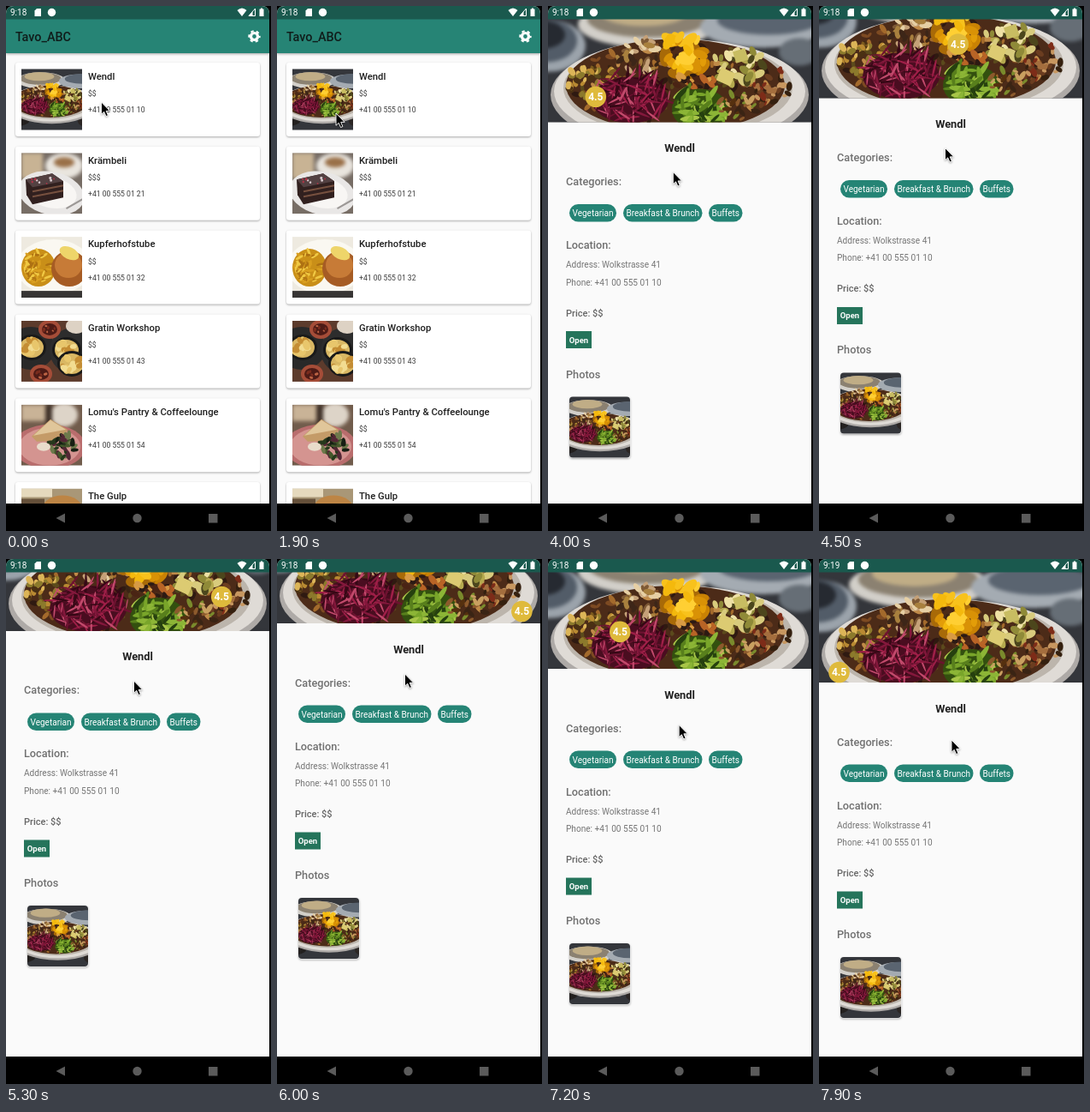
Animation of 310 by 612 pixels, one loop 8000 ms. Source, as an HTML page:

```html
<!DOCTYPE html>
<html lang="en">
<head>
<meta charset="utf-8">
<title>Restaurant list</title>
<style>
html, body { margin: 0; width: 100%; height: 100%; overflow: hidden; background: #000; }
svg { display: block; font-family: Roboto, "Noto Sans", sans-serif; }
.card { fill: #fff; filter: drop-shadow(0 1px 1px rgba(0,0,0,.32)); }
.name { font-size: 11.3px; font-weight: 500; fill: #202020; }
.small { font-size: 8.6px; fill: #3c3c3c; }
.head { font-size: 12.7px; font-weight: 500; fill: #707070; }
.line { font-size: 10.1px; fill: #757575; }
.chip rect { fill: #258475; }
.chip text { font-size: 10.05px; fill: #fff; }
.soft { filter: blur(2px); }
.mid { text-anchor: middle; }
</style>
</head>
<body>
<svg width="310" height="612" viewBox="0 0 310 612">
  <defs>
    <clipPath id="screen"><path d="M0 580V9Q0 0 9 0H299Q308 0 308 9V580Z"/></clipPath>
    <clipPath id="square"><rect width="71" height="71"/></clipPath>
    <clipPath id="round"><rect width="71" height="71" rx="4"/></clipPath>
    <clipPath id="header"><rect id="headerBox" y="15" width="308" height="129"/></clipPath>
    <symbol id="salad" viewBox="0 -8 308 205" overflow="visible"></symbol>
  </defs>

  <g clip-path="url(#screen)">
    <rect width="308" height="580" fill="#fafafa"/>

    <g id="list">
      <g id="rows"></g>
      <rect y="15" width="308" height="40" fill="#268475" style="filter:drop-shadow(0 1px 1.5px rgba(0,0,0,.35))"/>
      <text x="11" y="41" font-size="14.4" font-weight="500" fill="#101c1a">Tavo_ABC</text>
      <g transform="translate(290.500 35.500)" fill="none" stroke="#fff">
        <circle r="4" stroke-width="3.200"/>
        <circle r="6.200" stroke-width="2" stroke-dasharray="3.250 3.243" stroke-dashoffset="1.600"/>
      </g>
    </g>

    <g id="detail">
      <g clip-path="url(#header)"><g id="hero"><use href="#salad" y="-8" width="308" height="205"/></g></g>
      <g id="info">
        <text class="mid" x="154" y="178.500" font-size="12.800" font-weight="700" fill="#202020">Wendl</text>
        <text class="head" x="21" y="217.500">Categories:</text>
        <g class="chip mid" id="chips"></g>
        <text class="head" x="21" y="291.500">Location:</text>
        <text class="line" x="21" y="313.500">Address: Wolkstrasse 41</text>
        <text class="line" x="21" y="334">Phone: +41 00 555 01 10</text>
        <text x="21" y="370" font-size="11" font-weight="500" fill="#666">Price: $$</text>
        <rect x="21" y="387.500" width="30" height="20" fill="#25745b"/>
        <text class="mid" x="36" y="401" font-size="9.500" font-weight="700" fill="#fff">Open</text>
        <text class="head" x="21" y="442">Photos</text>
        <rect class="card" x="25" y="464" width="71.500" height="71.500" rx="4"/>
        <g transform="translate(25 464)" clip-path="url(#round)"><use href="#salad" x="-17.800" width="106.700" height="71"/></g>
      </g>
      <g id="badge">
        <circle r="12.300" fill="#dfba3c"/>
        <text class="mid" y="4.300" font-size="12" font-weight="700" fill="#fff">4.5</text>
      </g>
    </g>

    <rect width="308" height="15.500" fill="#1a594e"/>
    <g fill="#fff">
      <text id="clock" x="5" y="11" font-size="10">9:18</text>
      <path d="M36 3H41V12H33.500V5.500Z"/>
      <circle cx="53.500" cy="7.500" r="4.700"/>
      <path d="M270.500 5Q276 0 281.500 5L276 12Z"/>
      <path d="M284 11.500L291.500 3V11.500Z" fill="none" stroke="#fff"/>
      <path d="M284 11.500L288.500 6.500V11.500Z"/>
      <path d="M296.500 3.500H298V2.500H300V3.500H301.500V12H296.500Z"/>
    </g>
  </g>

  <g fill="#5b5b5b">
    <path d="M58.500 597L69 591.500V602.500Z"/>
    <circle cx="153.500" cy="597" r="5.200"/>
    <rect x="237" y="592" width="10.500" height="10.500"/>
  </g>
  <g id="cursor">
    <path d="M0 0V15.500L3.500 12.300L6 18L8.600 16.900L6.200 11.300H11Z" transform="scale(.92)" fill="#000" stroke="#fff"
      style="filter:drop-shadow(0 1px 1px rgba(0,0,0,.35))"/>
  </g>
</svg>

<script>
const $ = id => document.getElementById(id);

let seed = 11;
const rand = () => (seed = seed * 16807 % 2147483647) / 2147483647;
const ell = (x, y, rx, ry, fill, turn = 0) =>
  `<ellipse cx="${x}" cy="${y}" rx="${rx}" ry="${ry}" fill="${fill}" transform="rotate(${turn} ${x} ${y})"/>`;
const box = (x, y, w, h, fill, turn = 0) =>
  `<rect x="${x}" y="${y}" width="${w}" height="${h}" fill="${fill}" transform="rotate(${turn} ${x} ${y})"/>`;
const soft = s => `<g class="soft">${s}</g>`;

// Random flecks inside an ellipse
function scatter(x, y, rx, ry, count, size, thin, colors) {
  let out = "";
  for (let i = 0; i < count; i++) {
    const a = rand() * 6.283, r = Math.sqrt(rand()), w = size * (.6 + rand() * .7);
    out += ell((x + Math.cos(a) * r * rx).toFixed(1), (y + Math.sin(a) * r * ry).toFixed(1),
      w.toFixed(1), (w * thin).toFixed(1), colors[i % colors.length], Math.floor(rand() * 180));
  }
  return out;
}

$("salad").innerHTML =
  box(-2, -12, 312, 214, "#34363b") +
  soft(ell(2, 55, 42, 30, "#9ba3ab") + ell(-2, 49, 36, 25, "#525c68") + ell(-5, 42, 25, 16, "#262a31") +
    ell(117, 30, 82, 27, "#d2cfc9") + ell(116, 24, 70, 21, "#8b8171") + ell(112, 17, 50, 15, "#c0ad86") +
    ell(250, 33, 72, 24, "#a4abb2") + ell(258, 25, 60, 17, "#5a6470") + ell(294, 62, 24, 16, "#666e76") +
    ell(18, 166, 60, 20, "#23201f") + ell(292, 168, 50, 22, "#2b2624")) +
  ell(154, 112, 151, 64, "#aeaaa7") + ell(154, 108, 147, 61, "#dfdbd6") + ell(152, 104, 134, 56, "#bcb5ac") +
  ell(149, 101, 128, 54, "#4c2b18") +
  scatter(149, 101, 121, 49, 130, 5, .5, ["#7d4a22", "#2f1a11", "#a36a2c", "#5b4a1c", "#c08a48", "#3a2414"]) +
  scatter(55, 98, 34, 23, 55, 4.5, .65, ["#b98a32", "#dcb558", "#7c5a1e", "#4a3013", "#8c7a2c"]) +
  scatter(108, 66, 28, 21, 36, 6, .5, ["#c5a178", "#7e5a36", "#e6cfa4", "#3d2618", "#a8803e"]) +
  scatter(258, 101, 26, 24, 45, 4.5, .6, ["#6b3d20", "#a46e3e", "#34200f", "#c79760", "#7d2c18"]) +
  scatter(222, 79, 31, 23, 42, 6, .6, ["#d8cb7d", "#8f8a38", "#eee1a5", "#4c461c", "#b5a94e"]) +
  box(203, 80, 18, 16, "#dccb72", 24) + box(216, 62, 15, 14, "#c8bd62", -18) +
  scatter(162, 68, 26, 23, 18, 10, .6, ["#c98204", "#a86a08", "#e39d08"]) +
  scatter(159, 61, 23, 22, 24, 9, .55, ["#f4b90d", "#ffcf33", "#d99206", "#f8c21c"]) +
  scatter(170, 97, 26, 9, 18, 6, .5, ["#2c1a14", "#b96426", "#4a2414", "#d89a44"]) +
  ell(96, 118, 45, 27, "#4a0d20") +
  scatter(97, 114, 45, 29, 125, 9, .12, ["#9f1f48", "#6d1230", "#c24a6c", "#360815", "#84183c"]) +
  ell(178, 129, 33, 24, "#33500f") +
  scatter(177, 127, 32, 24, 45, 10, .26, ["#79a52a", "#a8c548", "#587f1c", "#26400f", "#8cb536"]) +
  scatter(224, 124, 24, 16, 30, 5, .45, ["#8c5a2c", "#3a2414", "#7a8a2c", "#c9a060", "#55300f"]);

const rosti = box(0, 0, 71, 71, "#eeeae0") + ell(38, 35, 44, 32, "#faf8f1") +
  ell(20, 36, 20, 22, "#c98f18") + scatter(20, 36, 18, 20, 55, 4, .3, ["#f0c843", "#d99f20", "#ae7112"]) +
  ell(56, 37, 21, 21, "#a65c24") + ell(55, 33, 16, 15, "#c77b37") +
  ell(56, 19, 12, 7, "#eed56a", 25) + box(0, 63, 71, 8, "#373534");

const cake = box(0, 0, 71, 71, "#776d65") +
  soft(box(0, 0, 25, 30, "#c8b394") + ell(50, 15, 22, 15, "#e9e5de") + ell(50, 11, 12, 6, "#9a7048")) +
  ell(35, 47, 39, 25, "#e9e7e6", 12) + ell(35, 46, 30, 18, "#f8f6f4", 12) +
  `<path d="M5 31L36 24L49 33V52L13 60L6 49Z" fill="#31201f"/><path d="M5 31L36 24L49 33L13 40Z" fill="#534142"/>
   <path d="M13 45L49 38M13 51L49 44" stroke="#76503f" stroke-width="2"/>` +
  scatter(26, 32, 15, 4, 9, 1.4, 1, ["#aa3547", "#d5c8cc"]) + box(52, 64, 24, 2, "#9c9896", -30);

const potato = (x, y) => ell(x, y, 17, 15, "#191919") + ell(x, y, 14, 12, "#d9b763") +
  scatter(x, y, 11, 9, 12, 5, .7, ["#f2dc91", "#e8c66c", "#c48d34"]);
const raclette = box(0, 0, 71, 71, "#5c3b2c") + ell(11, 32, 28, 25, "#292929") + ell(61, 35, 28, 27, "#2d2d2d") +
  potato(12, 31) + potato(53, 34) + potato(59, 50) +
  [[33, 10], [23, 62]].map(([x, y]) => ell(x, y, 13, 11, "#a54d38") + ell(x, y, 9, 7, "#4d1b16") +
    scatter(x, y, 7, 5, 7, 2, .7, ["#bd6444", "#7a2c1e"])).join("") +
  ell(64, 6, 12, 9, "#ddd2c4");

const brunch = box(0, 0, 71, 71, "#715c4c") +
  soft(box(0, 0, 30, 19, "#c9b397") + ell(50, 12, 16, 14, "#ddd4c8") + box(28, 0, 8, 24, "#403229")) +
  ell(33, 49, 42, 26, "#b96d6d") + ell(33, 49, 36, 22, "#d49490") +
  `<path d="M12 37L34 17L54 29L49 42L18 43Z" fill="#c49b68"/><path d="M14 36L34 18L52 29Z" fill="#e0c69a"/>` +
  scatter(49, 48, 15, 14, 36, 5, .45, ["#26381c", "#43582a", "#171f13", "#6d794b", "#542735"]) +
  ell(26, 49, 8, 5, "#e9dccb");

const burger = box(0, 0, 71, 71, "#a99777") + box(0, 0, 36, 10, "#e5d9bd") +
  ell(48, 25, 24, 17, "#bd8545") + box(0, 12, 27, 20, "#65503a");

const saladThumb = '<use href="#salad" x="-17.8" width="106.7" height="71"/>';
const places = [
  ["Wendl", "$$", "+41 00 555 01 10", saladThumb],
  ["Krämbeli", "$$$", "+41 00 555 01 21", cake],
  ["Kupferhofstube", "$$", "+41 00 555 01 32", rosti],
  ["Gratin Workshop", "$$", "+41 00 555 01 43", raclette],
  ["Lomu's Pantry &amp; Coffeelounge", "$$", "+41 00 555 01 54", brunch],
  ["The Gulp", "$$", "+41 00 555 01 65", burger]
];
$("rows").innerHTML = places.map(([name, price, phone, photo], i) =>
  `<g transform="translate(0 ${66 + i * 97.8})">
    <rect class="card" x="11" width="286" height="86" rx="3"/>
    <g transform="translate(18 7.5)" clip-path="url(#square)">${photo}</g>
    <text class="name" x="96" y="19.800">${name}</text>
    <text class="small" x="96" y="39">${price}</text>
    <text class="small" x="96" y="58">${phone}</text>
  </g>`).join("");

$("chips").innerHTML = [["Vegetarian", 25, 55], ["Breakfast &amp; Brunch", 88, 92.5], ["Buffets", 188, 39.5]]
  .map(([label, x, w]) => `<rect x="${x}" y="239.500" width="${w}" height="20.500" rx="10.250"/>
    <text x="${x + w / 2}" y="253.600">${label}</text>`).join("");

// Linear interpolation through [time, value] points
function track(t, points) {
  const next = points.findIndex(p => p[0] > t);
  if (next === 0) return points[0][1];
  if (next < 0) return points[points.length - 1][1];
  const [t0, a] = points[next - 1], [t1, b] = points[next];
  return a + (b - a) * (t - t0) / (t1 - t0);
}

const LOOP = 8000, OPEN_AT = 2400, MINUTE_AT = 7300;
const scroll = [[3850, 0], [4500, 36.5], [5300, 60], [5600, 69], [6050, 69], [6600, 48], [7500, 0]];
const cursorX = [[200, 111.5], [1000, 69], [3300, 69], [3850, 146], [4500, 147.5], [5300, 149.5], [6600, 149.5], [7500, 155]];
const cursorY = [[200, 112], [1000, 125], [3300, 125], [3850, 202], [4500, 165.5], [5300, 142], [5600, 133], [6050, 134], [6600, 158], [7500, 211]];
// The badge dips along a curve while the header folds
const badgeY = s => 132 - 2.378 * s + .0363 * s * (s - 37) + .000278 * s * (s - 37) * (s - 48);
const move = (id, x, y) => $(id).setAttribute("transform", `translate(${x} ${y})`);

function draw(now) {
  const t = now % LOOP, s = track(t, scroll), open = t >= OPEN_AT;
  $("list").style.display = open ? "none" : "";
  $("detail").style.display = open ? "" : "none";
  $("headerBox").setAttribute("height", 129 - s);
  move("hero", 0, -s);
  move("info", 0, -s);
  move("badge", 23.5 + 3.81 * s, badgeY(s));
  move("cursor", track(t, cursorX), track(t, cursorY));
  $("clock").textContent = t < MINUTE_AT ? "9:18" : "9:19";
}

const start = performance.now();
function tick() {
  draw(performance.now() - start);
  requestAnimationFrame(tick);
}
tick();
</script>
</body>
</html>
```
